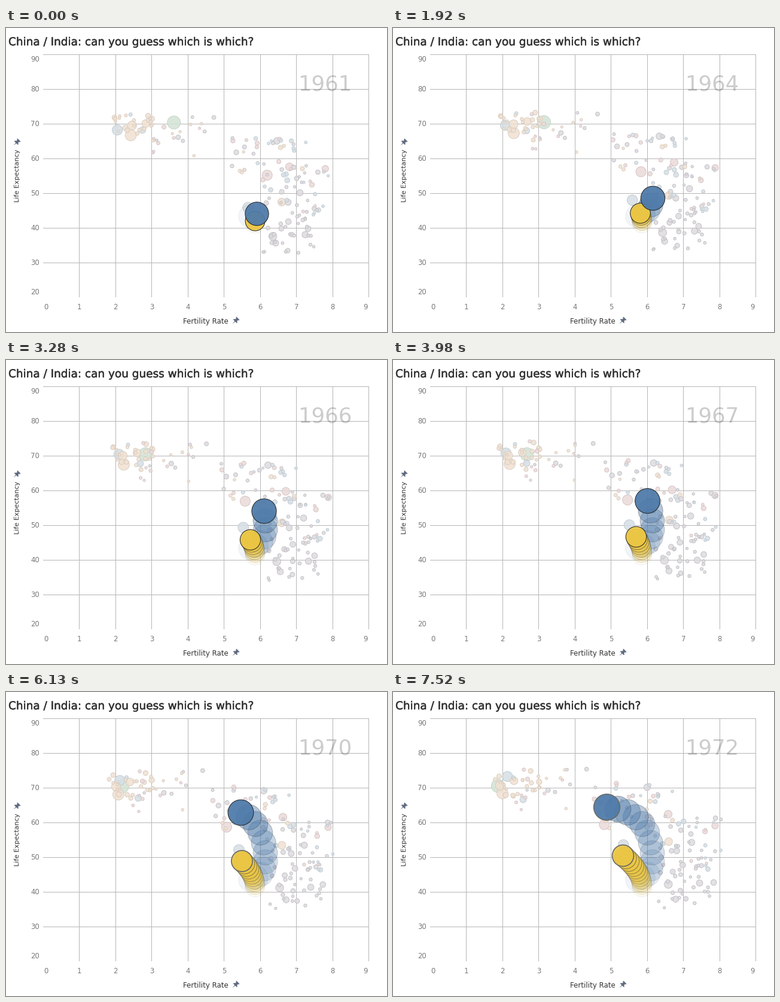
Animation of 637x508 px, one loop 8000 ms. Source, as a matplotlib script:

```python
import numpy as np
import matplotlib.pyplot as plt
from matplotlib.animation import FuncAnimation
from matplotlib.colors import to_rgba
from matplotlib.patches import Polygon
from matplotlib.patheffects import withStroke

W, H, DPI = 637, 508, 100
PT = 72 / DPI  # points per pixel
STEP, LOOP = 40, 8000
CHANGES = [620, 1230, 1920, 2580, 3280, 3980, 4780, 5490, 6130, 6840, 7520]
YEARS = len(CHANGES) + 1

plt.rcParams["font.family"] = "DejaVu Sans"
rng = np.random.default_rng(4)

fig = plt.figure(figsize=(W / DPI, H / DPI), dpi=DPI, facecolor="white")
ax = fig.add_axes([0, 0, 1, 1])
ax.set(xlim=(0, W), ylim=(H, 0))
ax.axis("off")


def label(x, y, s, px, color, weight=0, **kw):
    kw = {"ha": "center", "va": "center", **kw}
    text = ax.text(x, y, s, fontsize=px * PT, color=color, **kw)
    if weight:
        text.set_path_effects([withStroke(linewidth=weight, foreground=color)])
    return text


def pin(x, y):
    half = np.array([(-7, 0), (-1, 0.7), (-1, 4.2), (0.7, 4.2), (1.6, 2.3),
                     (4.2, 2.1), (4.6, 3.6), (6.2, 3.6)])
    shape = np.vstack([half, half[::-1] * (1, -1)])
    turn = np.array([(1, -1), (1, 1)]) / np.sqrt(2)
    ax.add_patch(Polygon(shape @ turn + (x, y), color="#5f6b80", lw=0))


def area(radius):
    return (2 * np.asarray(radius) * PT) ** 2


# Static chart
grid = dict(color="#b6b6b6", lw=PT, zorder=1, snap=False)
ax.hlines(44.5 + 58 * np.arange(7), 62, 607, **grid)
ax.vlines(np.floor(62 + 60.5 * np.arange(1, 10)) + 0.5, 44, 450, **grid)
for v in range(20, 91, 10):
    y = np.clip(566.5 - 5.8 * v, 52.5, 441.5)
    label(56, y, v, 11.6, "#787878", ha="right")
for v in range(10):
    label(np.clip(62 + 60.5 * v, 67, 601), 466, v, 11.6, "#787878")

label(4, 29, "China / India: can you guess which is which?", 18.45, "#333333",
      weight=0.35, ha="left", va="baseline")
label(334, 494, "Fertility Rate", 11.7, "#333333", va="baseline")
label(19.5, 246.5, "Life Expectancy", 11.1, "#333333", rotation=90)
pin(383.5, 489.5)
pin(17.5, 191.5)
year_text = label(533.5, 104.5, "", 35.5, "black", va="baseline", alpha=0.2)

# Faded countries: fill and edge by region
FADED = {
    "orange": ("#f0e1d2", "#d8cbbe"),
    "blue": ("#d5dfe5", "#bfc9d0"),
    "pink": ("#ecdada", "#d3c2c2"),
    "grey": ("#dddbdf", "#c0bec3"),
    "green": ("#d3e3d5", "#c3d3c5"),
}

# Big countries: region, start, end, radius
BIG = [
    ("green", (281, 158), (178, 155), 11),
    ("orange", (208, 180), (183, 171), 9.3),
    ("orange", (210, 163), (178, 155), 7.5),
    ("orange", (234, 159), (205, 148), 6.5),
    ("blue", (186, 170), (191, 140), 8.5),
    ("pink", (436, 246), (351, 220), 8.5),
    ("pink", (474, 232), (460, 205), 6.5),
    ("blue", (404, 300), (385, 254), 8.8),
    ("orange", (461, 291), (461, 250), 6.5),
    ("grey", (446, 348), (459, 322), 6.7),
]

# Small countries: count, box centre, half size, drift, regions
CROWDS = [
    (22, (212, 160), (34, 18), (-6, -2), ["orange"] * 6 + ["blue"]),
    (20, (290, 180), (60, 32), (-32, -20), ["orange", "pink", "grey"]),
    (34, (442, 212), (66, 30), (-38, -20), ["pink", "blue", "grey", "orange"]),
    (42, (484, 270), (56, 42), (8, -22), ["grey", "grey", "blue", "pink"]),
    (32, (472, 344), (44, 36), (16, -26), ["grey"]),
]

t = np.linspace(0, 1, YEARS)[:, None]
countries = []


def add_country(region, start, end, radius, wobble=0.4):
    start, end = np.array(start), np.array(end)
    drift = rng.normal(0, wobble, (YEARS, 2)).cumsum(axis=0)
    countries.append((radius, start + (end - start) * t + drift, region))


for big in BIG:
    add_country(*big)
for count, centre, half, shift, regions in CROWDS:
    for _ in range(count):
        start = np.array(centre) + np.array(half) * rng.uniform(-1, 1, 2)
        end = start + shift + rng.normal(0, 6, 2)
        radius = min(2.1 + rng.exponential(0.9), 5.5)
        add_country(rng.choice(regions), start, end, radius, 1)

countries.sort(key=lambda c: -c[0])  # small marks on top
radii, paths, regions = zip(*countries)
paths = np.array(paths)
dots = ax.scatter(*paths[:, 0].T, s=area(radii), linewidths=0.9 * PT, zorder=2,
                  c=[to_rgba(FADED[r][0], 0.85) for r in regions],
                  edgecolors=[FADED[r][1] for r in regions])


class Country:
    """Highlighted bubble; index 0 is the year before the first one shown."""

    def __init__(self, color, x, y, radius, strength, soft, z):
        self.color, self.strength, self.soft = color, strength, soft
        self.pos = np.column_stack([x, y])
        self.size = area(radius)
        self.trail = ax.scatter([], [], linewidths=PT, zorder=z)
        self.head = ax.scatter([], [], zorder=7 - z)

    def show(self, k):
        n = k + 1
        fade = 0.08 + self.strength * np.arange(n) / max(n, 3)
        self.trail.set_offsets(self.pos[:n])
        self.trail.set_sizes(self.size[:n])
        self.trail.set_facecolor([to_rgba(self.color, a) for a in fade])
        self.trail.set_edgecolor([to_rgba("#333333", 0.8 * a) for a in fade])

        soft = 1961 + k in self.soft
        self.head.set_offsets(self.pos[n:n + 1])
        self.head.set_sizes(self.size[n:n + 1])
        self.head.set_facecolor(to_rgba(self.color, 0.94))
        self.head.set_edgecolor("#6a6a66" if soft else "#222222")
        self.head.set_linewidth((1.7 if soft else 1) * PT)


k = np.arange(-1, YEARS)
blue = Country("#4e7aa9", 434 - 1.33 * (k - 3.4) ** 2,
               253.5 - 67 * np.tanh((k - 4.9) / 3.9),
               19.6 + 0.2 * k, 0.4, {1965, 1968, 1972}, 3)
yellow = Country("#ebc644", 416.2 - 0.4 * k - 0.23 * k ** 2, 321.7 - 4.4 * k,
                 16.4 + 0.14 * k, 0.7, {1965, 1970, 1972}, 3.5)
blue.head.set_zorder(5)


def draw(i):
    year = int(np.searchsorted(CHANGES, i * STEP + 30, side="right"))
    year_text.set_text(str(1961 + year))
    dots.set_offsets(paths[:, year])
    blue.show(year)
    yellow.show(year)
    return dots, year_text


anim = FuncAnimation(fig, draw, frames=LOOP // STEP, interval=STEP,
                     repeat=True, repeat_delay=0, blit=False)
plt.show()
```
